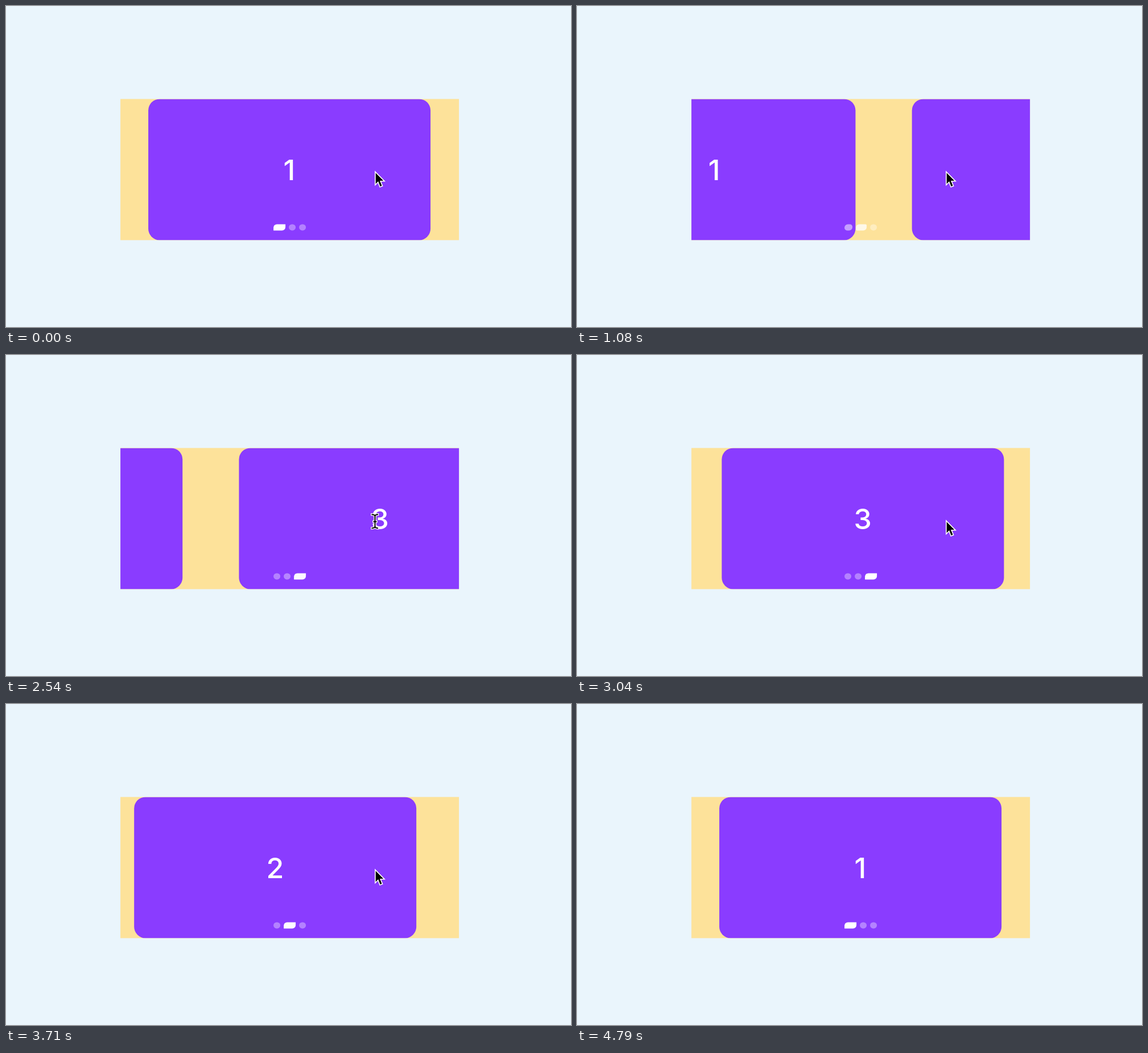
Recreate the animation shown at these times as an HTML page. Size 993 by 564 pixels, loop 4830 ms.

```html
<!DOCTYPE html>
<html lang="en">
<head>
<meta charset="utf-8">
<title>Carousel</title>
<style>
  html, body { margin: 0; width: 100%; height: 100%; overflow: hidden; background: #eaf5fc; }
  .stage { position: relative; width: 993px; height: 564px; overflow: hidden; }
  .view {
    position: absolute; left: 201px; top: 163px; width: 595px; height: 248px;
    overflow: hidden; background: #fde29a; transform: translate(.1px, .4px);
  }
  .slide {
    position: absolute; left: 49.2px; top: 0; width: 496px; height: 248px;
    border-radius: 20px; background: #8a3cff; color: #fff;
    font: 500 50px/250px Inter, Roboto, sans-serif; text-align: center; text-indent: -1px;
  }
  .dots {
    position: absolute; left: 0; top: 219.6px; width: 100%;
    display: flex; justify-content: center; gap: 6.2px;
  }
  .dots i { flex: none; height: 11.8px; }
  svg { position: absolute; left: 0; top: 0; overflow: visible; }
</style>
</head>
<body>
<div class="stage">
  <div class="view">
    <div class="slide">1</div>
    <div class="slide">2</div>
    <div class="slide">3</div>
    <div class="dots"><i></i><i></i><i></i></div>
  </div>
  <svg id="cursor" width="30" height="40">
    <path id="arrow" d="M1.7 4V23.2L6.2 18.8L9.6 27.8L12.6 26.6L9 17.7H15.2Z"
      fill="#000" stroke="#fff" stroke-width="3.2" paint-order="stroke"/>
    <g id="beam" fill="none" stroke-linecap="square">
      <path d="M-4.5 -9Q0 -9 .5 -6Q1 -9 5 -9M.5 -6V12M-4.5 15Q0 15 .5 12Q1 15 5 15M-1.5 3.5H2.5"
        stroke="#fff" stroke-width="4.6"/>
      <path d="M-4.5 -9Q0 -9 .5 -6Q1 -9 5 -9M.5 -6V12M-4.5 15Q0 15 .5 12Q1 15 5 15M-1.5 3.5H2.5"
        stroke="#000" stroke-width="2"/>
    </g>
  </svg>
</div>
<script>
const LOOP = 4830, TICK = 125 / 3;
const PITCH = 595.2, REACH = 545.5;
const MID = 498.4, POINT = { x: 648, y: 289.2 };

// Each snap frame of 16 ms moves 1.1 times less than the one before
const TAU = 16 / Math.log(1.1), SPLIT = .43, END = 1 + 4 / PITCH;

// start of the push, moment of release, direction
const SWIPES = [
  [685, 1083, 1],
  [2215, 2417, 1],
  [3093, 3293, -1],
  [3714, 3914, -1]
];

const slides = [...document.querySelectorAll('.slide')];
const dots = [...document.querySelectorAll('.dots i')];
const cursor = document.getElementById('cursor');
const arrow = document.getElementById('arrow');
const beam = document.getElementById('beam');

const clamp = v => Math.min(1, Math.max(0, v));

// CSS "ease": cubic-bezier(.25, .1, .25, 1)
function ease(x) {
  const curve = (a, b, s) => 3 * (1 - s) ** 2 * s * a + 3 * (1 - s) * s * s * b + s ** 3;
  let lo = 0, hi = 1;
  for (let i = 0; i < 24; i++) {
    const s = (lo + hi) / 2;
    if (curve(.25, .25, s) < x) lo = s; else hi = s;
  }
  return curve(.1, 1, lo);
}

// Push up to the release, then decay to the snap point at matching speed
function swipe(t, start, release) {
  const rest = END - SPLIT, span = release - start;
  if (t <= start) return 0;
  if (t < release) return SPLIT * ((t - start) / span) ** (rest / TAU * span / SPLIT);
  return Math.min(1, END - rest * Math.exp((release - t) / TAU));
}

// Indicator follows its slide through the viewport
function activity(d) {
  return d > 0 ? ease(clamp(1 - d / REACH)) : 1 - ease(clamp(-d / REACH));
}

function draw(time) {
  const t = Math.floor((time + 5) / TICK) * TICK;
  const pos = SWIPES.reduce((sum, [a, b, dir]) => sum + dir * swipe(t, a, b), 0);
  let overText = false;

  slides.forEach((slide, i) => {
    const d = (i - pos) * PITCH;
    const on = activity(d);
    slide.style.transform = `translateX(${d}px)`;
    if (Math.abs(MID + d - POINT.x) < 16) overText = true;

    const dot = dots[i].style;
    dot.width = 12 + 9.5 * on + 'px';
    dot.borderRadius = `6px ${6 * (1 - on)}px`;
    dot.background = `rgba(255,255,255,${.36 + .64 * on})`;
  });

  const leave = clamp((t - 4580) / 205);
  cursor.style.transform = `translate(${POINT.x}px, ${POINT.y - 340 * leave * leave}px)`;
  arrow.style.display = overText ? 'none' : '';
  beam.style.display = overText ? '' : 'none';
}

const begin = performance.now();
function frame() {
  draw((performance.now() - begin) % LOOP);
  requestAnimationFrame(frame);
}
draw(0);
requestAnimationFrame(frame);
</script>
</body>
</html>
```
